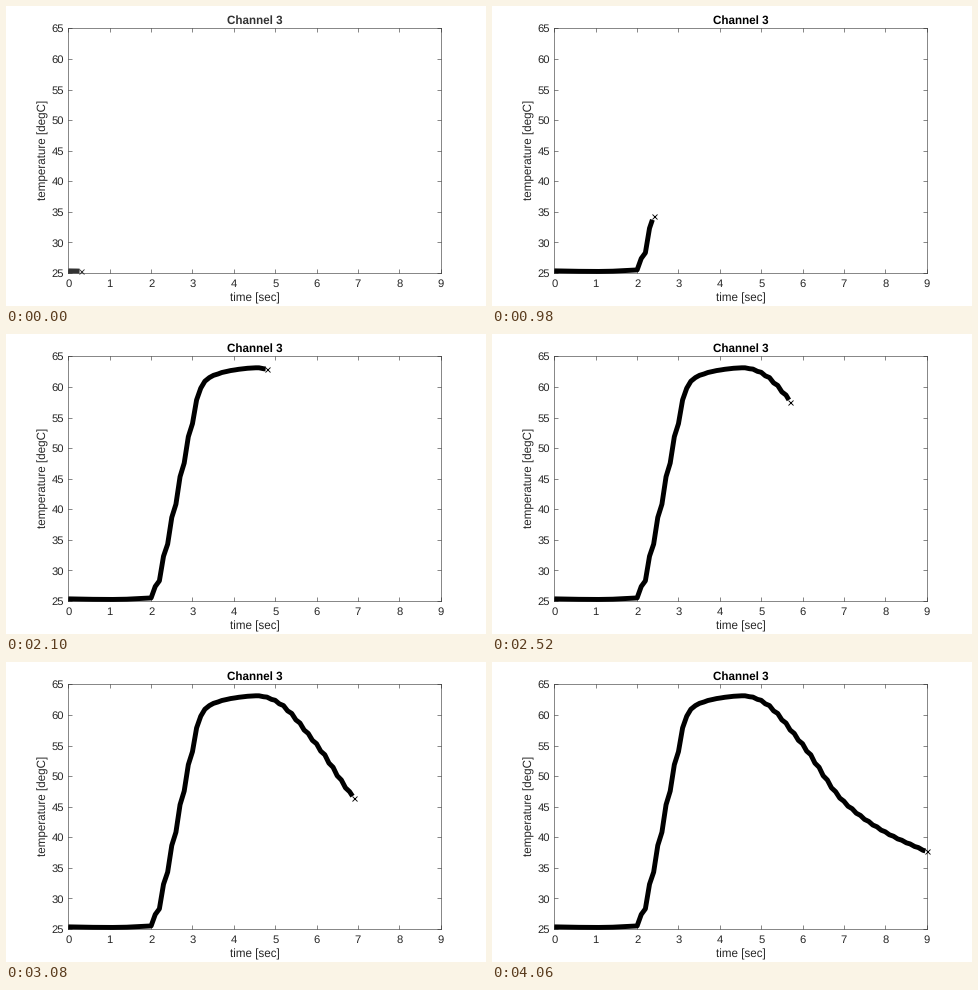
Write a matplotlib script that moves like this. It is 480x300 px and loops after 4.2 s.

```python
import numpy as np
import matplotlib.pyplot as plt
from matplotlib.animation import FuncAnimation

W, H, DPI = 480, 300, 72
FRAMES, INTERVAL = 30, 140
T_END = 9.0
LEFT, RIGHT, TOP, BOTTOM = 62.4, 434.6, 22.4, 267
INK = "#262626"
THIN = 0.55

plt.rcParams.update({
    "font.family": "Liberation Sans",
    "text.hinting": "none",
    "axes.edgecolor": INK,
    "axes.linewidth": THIN,
})

# Key points (seconds, degC): rest, heating, plateau, cooling
KEYS = [(0, 25.35), (1, 25.25), (2, 25.5), (2.2, 28.3), (2.4, 34.3), (3, 54),
        (3.2, 59.8), (3.4, 61.5), (4, 62.75), (4.6, 63.15), (5, 62.4),
        (6, 55.3), (7, 45.9), (8, 40.9), (9, 37.7)]


def smooth(x, points):
    """Monotone cubic curve through the points."""
    px, py = np.array(points, float).T
    h = np.diff(px)
    slope = np.diff(py) / h
    a, b = slope[:-1], slope[1:]
    inner = np.where(a * b > 0, 2 * a * b / (a + b), 0)
    tangent = np.r_[slope[0], inner, slope[-1]]
    k = np.clip(np.searchsorted(px, x, side="right") - 1, 0, len(h) - 1)
    s = (x - px[k]) / h[k]
    bend = (1 - s) * (tangent[k] - slope[k]) - s * (tangent[k + 1] - slope[k])
    return py[k] + h[k] * slope[k] * s + h[k] * s * (1 - s) * bend


def temperature(t):
    """Straight 0.1 s pieces; every odd one takes two thirds of the step."""
    even = smooth(np.arange(46) / 5, KEYS)
    knots = np.empty(91)
    knots[::2] = even
    knots[1::2] = even[:-1] + 0.67 * np.diff(even)
    return np.interp(t, np.arange(91) / 10, knots)


fig = plt.figure(figsize=(W / DPI, H / DPI), dpi=DPI, facecolor="white")
ax = fig.add_axes([LEFT / W, 1 - BOTTOM / H,
                   (RIGHT - LEFT) / W, (BOTTOM - TOP) / H])
ax.set(xlim=(0, 9), ylim=(25, 65), xticks=range(10), yticks=range(25, 66, 5))
ax.tick_params(direction="in", top=True, right=True, length=3.7, width=THIN,
               color=INK, labelcolor=INK, labelsize=11.2, pad=4.4)
ax.tick_params(axis="x", pad=6.2)


def label(x, y, text, **style):
    """Text with its baseline placed in stage pixels, y pointing down."""
    return fig.text(x / W, 1 - y / H, text, ha="center", va="baseline",
                    **{"fontsize": 11.6, "color": INK, **style})


title = label(248.8, 18.2, "Channel 3", weight="bold")
label(248.6, 295.6, "time [sec]")
label(41, 144, "temperature [degC]", rotation=90, rotation_mode="anchor")

trace, = ax.plot([], [], lw=4.9, solid_capstyle="butt", clip_on=False, zorder=3)
tip, = ax.plot([], [], "x", markersize=5, markeredgewidth=0.9,
               clip_on=False, snap=False, zorder=3)


def draw(i):
    now = T_END * (i + 1) / FRAMES
    t = np.arange(0, now - 0.025, 0.01)
    trace.set_data(t, temperature(t))
    tip.set_data([now], [temperature(now)])
    for artist in (trace, tip, title):
        artist.set_color("#333333" if i == 0 else "black")
    return trace, tip, title


anim = FuncAnimation(fig, draw, frames=FRAMES, interval=INTERVAL,
                     repeat=True, repeat_delay=0)
plt.show()
```
